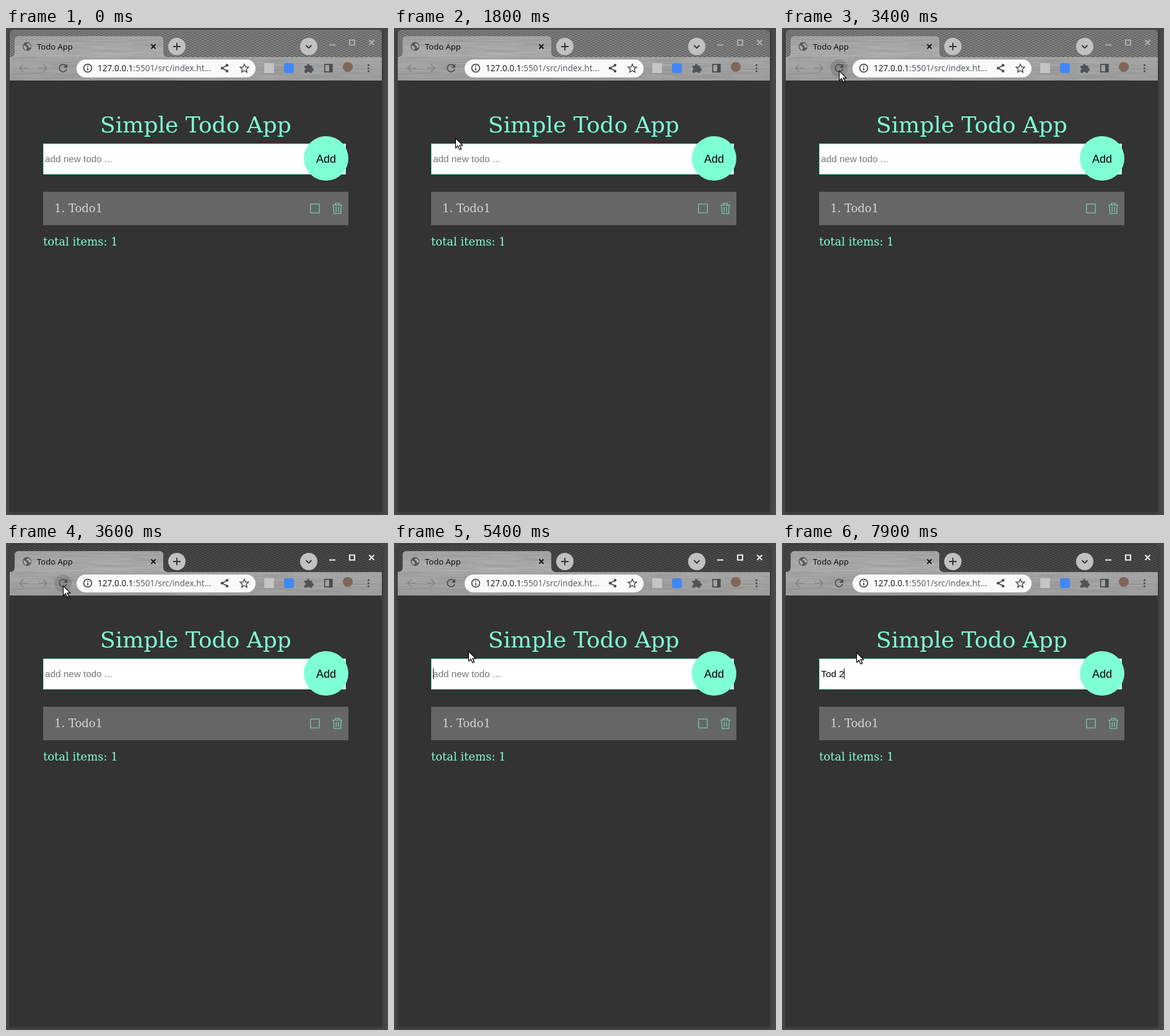
These frames come from a looping animation (617 by 788 pixels, 8000 ms). An HTML page:

```html
<!DOCTYPE html>
<html lang="en">
<head>
<meta charset="utf-8">
<title>Simple Todo App</title>
<style>
html, body { margin: 0; width: 100%; height: 100%; overflow: hidden; background: #4c4b4a; }
svg { display: block; width: 100%; height: 100%; }
text { white-space: pre; }
.ui { font-family: "Noto Sans", "Open Sans", sans-serif; }
.serif { font-family: "DejaVu Serif", serif; }
.sans { font-family: "Liberation Sans", Arial, sans-serif; }
.line { fill: none; stroke: #484a4c; stroke-width: 1.7; }
</style>
</head>
<body>
<svg viewBox="0 0 617 788">
  <defs>
    <pattern id="weave" width="8" height="4" patternUnits="userSpaceOnUse">
      <path d="M0 .5h4M4 2.5h4" stroke="#000" stroke-opacity=".28"/>
      <path d="M0 1.5h4M4 3.5h4" stroke="#fff" stroke-opacity=".07"/>
    </pattern>
    <linearGradient id="metal" x2="0" y2="1">
      <stop stop-color="#b2b2b2"/><stop offset="1" stop-color="#a2a2a2"/>
    </linearGradient>
    <linearGradient id="tabFill" x2="0" y2="1">
      <stop stop-color="#a8a8a8"/><stop offset="1" stop-color="#b2b2b2"/>
    </linearGradient>
    <filter id="brush" x="0" y="0" width="1" height="1">
      <feTurbulence type="fractalNoise" baseFrequency=".015 .7" numOctaves="2" seed="4"/>
      <feColorMatrix values="0 0 0 0 0  0 0 0 0 0  0 0 0 0 0  .5 0 0 0 -.17"/>
      <feComposite in2="SourceGraphic" operator="in"/>
    </filter>
    <filter id="soft" x="-10%" y="-10%" width="120%" height="120%"><feGaussianBlur stdDeviation="3"/></filter>
    <filter id="glow" x="-50%" y="-50%" width="200%" height="200%"><feGaussianBlur stdDeviation=".8"/></filter>
    <path id="frame" d="M6 47V9q0-7 7-7H600q7 0 7 7V47Z"/>
    <path id="chrome" d="M6 47q8 0 8-8V20q0-7 7-7H247q7 0 7 7V39q0 8 8 8H607V85H6Z"/>
    <path id="arrow" d="M.5 .5V16L4.2 12.7 6.8 18.6 9.5 17.4 6.9 11.7H11.7Z"/>
  </defs>

  <rect x="4" y="4" width="605" height="782" fill="#2a2a2a" opacity=".6" filter="url(#soft)"/>
  <rect width="617" height="2" fill="#444"/>

  <!-- title bar -->
  <use id="bar" href="#frame"/>
  <use href="#frame" fill="url(#weave)"/>
  <path d="M8 6.5q1-4 5-4H600q4 0 5 4" fill="none" stroke="#222" stroke-opacity=".5"/>
  <use href="#chrome" fill="url(#metal)"/>
  <path d="M14 46V20q0-7 7-7H247q7 0 7 7V46Z" fill="url(#tabFill)"/>
  <use href="#chrome" filter="url(#brush)" opacity=".5"/>
  <circle cx="34" cy="30" r="7.2" fill="#565859"/>
  <path d="M28.5 27.5l4 2.5 1.5 2-1.5 4q-4-2-4-6zM35 24.5l-2 3 3 1 1 3 3.5 0q.3-5-5.5-7z" fill="#acacac"/>
  <text class="ui" x="50" y="35" font-size="13" font-weight="500" fill="#111">Todo App</text>
  <path d="M234.5 26.5l7 7m0-7l-7 7" stroke="#111" stroke-width="1.8"/>
  <g fill="#c1c1c1"><circle cx="276" cy="30" r="14"/><circle cx="489" cy="30" r="14"/></g>
  <path d="M270 30h12M276 24v12M484.5 28l4.5 4.5 4.5-4.5" fill="none" stroke="#333" stroke-width="1.9"/>
  <path id="controls" d="M522 27.5h10M555 19.5h8v8h-8zM586.500 19.500l8 8m0-8l-8 8" fill="none" stroke-width="2"/>

  <!-- toolbar -->
  <g class="line" style="stroke:#858585">
    <path d="M35 65H22m6-6l-6 6 6 6M53 65H66m-6-6l6 6-6 6"/>
  </g>
  <circle id="hover" cx="92" cy="65" r="14" fill="#000" opacity="0"/>
  <path class="line" d="M96.700 61A6 6 0 1 0 98 66.300"/>
  <path d="M99 58v6.300h-6.300z" fill="#484a4c"/>
  <rect x="114" y="51" width="289" height="29" rx="14.500" fill="#fafafa"/>
  <circle class="line" cx="132" cy="65" r="6.400" stroke-width="1.500"/>
  <path d="M132 61v1.800M132 64.200v4.600" stroke="#484a4c" stroke-width="1.700"/>
  <text class="ui" x="148" y="70" font-size="13.600" fill="#5f6368"><tspan fill="#222">127.0.0.1</tspan>:5501/src/index.ht…</text>
  <path class="line" d="M357 60.500L349 65l8 4.500" stroke-width="1.400"/>
  <g fill="#484a4c"><circle cx="357" cy="60.300" r="2.200"/><circle cx="349" cy="65" r="2.200"/><circle cx="357" cy="69.700" r="2.200"/></g>
  <path class="line" style="stroke-width:1.400" d="M385 58.500l2 4.500 4.900.4-3.700 3.200 1.100 4.900-4.300-2.600-4.300 2.600 1.100-4.900-3.700-3.200 4.900-.4z"/>
  <rect x="417" y="57" width="16" height="16" rx="1" fill="#c4c4c4"/>
  <rect x="449" y="57" width="16" height="16" rx="4" fill="#4087f8"/>
  <path d="M482 61h4a2.300 2.300 0 1 1 4.500 0h4v4a2.300 2.300 0 1 1 0 4.500v3h-4a2.300 2.300 0 0 0-4.500 0h-4v-4a2.300 2.300 0 0 0 0-4.500z" fill="#515457"/>
  <path d="M514.800 58.800h12v12.400h-12z" class="line"/>
  <path d="M522 58h5v14h-5z" fill="#484a4c"/>
  <circle cx="552" cy="63" r="8" fill="#806657"/>
  <g fill="#484a4c"><circle cx="585.500" cy="60" r="1.600"/><circle cx="585.500" cy="65" r="1.600"/><circle cx="585.500" cy="70" r="1.600"/></g>

  <!-- page -->
  <rect x="6" y="85" width="601" height="698" fill="#333"/>
  <g fill="#7fffd4">
    <text class="serif" x="306.500" y="169" font-size="36" text-anchor="middle">Simple Todo App</text>
    <text class="serif" x="60" y="352" font-size="18">total items: 1</text>
    <rect x="60" y="187" width="489" height="50"/>
  </g>
  <rect x="61" y="188" width="487" height="48" fill="#fff"/>
  <text id="entry" class="sans" x="63" y="217" font-size="15.300"></text>
  <rect id="caret" y="203" width="1" height="17" fill="#000"/>
  <circle cx="517" cy="211" r="36" fill="#7fffd4"/>
  <text class="sans" x="517" y="218" font-size="18" text-anchor="middle">Add</text>
  <rect x="60" y="265" width="493" height="54" fill="#666"/>
  <text class="serif" x="78" y="298" font-size="18" fill="#d6d6d6">1. Todo1</text>
  <g fill="none" stroke="#73b8a3" stroke-width="1.600">
    <rect x="491.800" y="284.800" width="14.400" height="14.400" rx="1.200"/>
    <path d="M527 286.500h16.500M532 286v-2.200h6.500v2.200M529 287l.8 13.200h10.900l.8-13.200M533.300 289.500v8M537.200 289.500v8"/>
  </g>

  <g id="cursor">
    <use href="#arrow" x="1" y="1.500" opacity=".45" filter="url(#glow)"/>
    <use href="#arrow" fill="#fff" stroke="#000" stroke-width="1.100"/>
  </g>
</svg>
<script>
const $ = id => document.getElementById(id);
const LOOP = 8000, STEP = 100;

// pointer waypoints: time, x, y
const path = [
  [1000, 131, 0], [1300, 145, 115], [1500, 125, 158], [1800, 99, 178], [1900, 99, 178],
  [2400, 90, 125], [2500, 90, 125], [3400, 92, 69], [4400, 92, 69], [4700, 113, 129],
  [5000, 121, 173], [5100, 121, 173], [5500, 120, 175], [7400, 120, 175],
  [7500, 120, 176], [7600, 120, 176], [7700, 120, 177], [LOOP, 120, 177]
];
// typed value and caret position by start time
const typing = [[5900, "T", 72], [6000, "To", 79], [6100, "Tod", 87], [6300, "Tod ", 91], [6700, "Tod 2", 100]];
// caret visible spans
const blinks = [[3700, 4300], [4900, 5500], [5900, 7300], [7900, LOOP]];

const within = (t, [from, to]) => t >= from && t < to;

function pointer(t) {
  const i = Math.max(1, path.findIndex(p => p[0] > t));
  const [t0, x0, y0] = path[i - 1], [t1, x1, y1] = path[i];
  const k = (t - t0) / (t1 - t0);
  return [x0 + (x1 - x0) * k, y0 + (y1 - y0) * k].map(Math.round);
}

function draw(now) {
  const t = Math.floor(now % LOOP / STEP) * STEP;
  const active = t >= 3500;
  $("bar").setAttribute("fill", active ? "#444" : "#7a7a7a");
  $("controls").setAttribute("stroke", active ? "#f4f4f4" : "#b0b0b0");
  $("hover").setAttribute("opacity", within(t, [3400, 4900]) ? .12 : 0);

  const [, value, caretX] = typing.filter(k => k[0] <= t).pop() || [0, "", 63];
  $("entry").textContent = value || "add new todo ...";
  $("entry").setAttribute("fill", value ? "#000" : "#757575");
  $("caret").setAttribute("x", caretX);
  $("caret").setAttribute("visibility", blinks.some(b => within(t, b)) ? "visible" : "hidden");

  $("cursor").setAttribute("visibility", t >= 1000 ? "visible" : "hidden");
  $("cursor").setAttribute("transform", `translate(${pointer(t)})`);
}

const start = performance.now();
(function tick() {
  draw(performance.now() - start);
  requestAnimationFrame(tick);
})();
</script>
</body>
</html>
```
